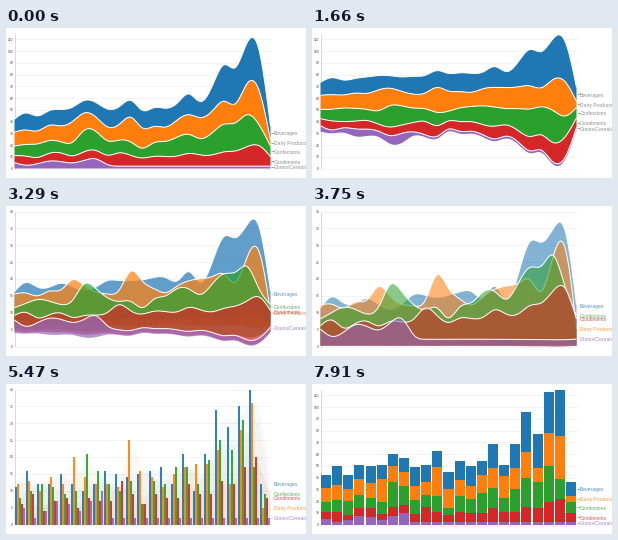
A matplotlib script that plays this animation: 300x150 px, repeating every 7.99 s.

```python
import numpy as np
import matplotlib.pyplot as plt
from matplotlib.animation import FuncAnimation
from matplotlib.collections import PolyCollection
from matplotlib.colors import to_rgb

W, H, DPI = 300, 150, 100
FRAMES, STEP = 170, 47
LEFT, RIGHT, BASE, TOP = 8.5, 264.5, 140.5, 5.5
PX = 72 / DPI

# monthly counts, back layer first
NAMES = ["Beverages", "Dairy Products", "Confections", "Condiments", "Grains/Cereals"]
COLORS = ["#1f77b4", "#ff7f0e", "#2ca02c", "#d62728", "#9467bd"]
DATA = np.array([
    [11, 16, 12, 12, 15, 12, 10, 12, 16, 15, 14, 15, 16, 17, 12, 21, 10, 21, 34, 29, 35, 40, 12],
    [12, 13, 10, 14, 12, 20, 14, 12, 12, 11, 25, 16, 14, 11, 15, 17, 18, 18, 22, 12, 28, 36, 5],
    [8, 10, 12, 11, 9, 10, 21, 16, 12, 10, 13, 6, 13, 12, 17, 17, 12, 19, 25, 22, 31, 17, 9],
    [6, 9, 4, 7, 8, 5, 8, 7, 7, 13, 9, 6, 9, 8, 8, 12, 9, 9, 13, 12, 17, 20, 8],
    [5, 2, 4, 7, 6, 4, 7, 10] + [2] * 15,
], float)
LAYERS, N = DATA.shape
STACK_MAX, GROUP_MAX = 115, 40
GREY = np.array([0.45, 0.45, 0.45])


def ypx(v, top):
    return BASE - np.asarray(v, float) / top * (BASE - TOP)


def ease(t, start, length):
    u = min(max((t - start) / length, 0), 1)
    return 4 * u**3 if u < 0.5 else 1 - 4 * (1 - u)**3


def mix(a, b, e):
    return a + (b - a) * e


def wiggle(rows):
    """Stream baseline that keeps the weighted slope of the layers small."""
    off = np.zeros(N)
    for j in range(1, N):
        d = rows[:, j] - rows[:, j - 1]
        slope = np.cumsum(d) - d / 2
        off[j] = off[j - 1] - (slope * rows[:, j]).sum() / rows[:, j].sum()
    return off - off.min()


def basis(n, sub=8):
    """Weights of a uniform cubic B-spline that meets both end points."""
    idx = np.clip(np.arange(-2, n + 2), 0, n - 1)
    rows = []
    for k in range(len(idx) - 3):
        for u in np.linspace(0, 1, sub, endpoint=False):
            row = np.zeros(n)
            w = ((1 - u)**3, 3 * u**3 - 6 * u**2 + 4,
                 -3 * u**3 + 3 * u**2 + 3 * u + 1, u**3)
            for m in range(4):
                row[idx[k + m]] += w[m] / 6
            rows.append(row)
    rows.append(np.eye(n)[-1])
    return np.array(rows)


upper = np.cumsum(DATA[::-1], axis=0)[::-1]
lower = upper - DATA
offset = wiggle(DATA[::-1])

stack_lo, stack_hi = ypx(lower, STACK_MAX), ypx(upper, STACK_MAX)
stream_lo, stream_hi = ypx(lower + offset, STACK_MAX), ypx(upper + offset, STACK_MAX)
group_lo, group_hi = ypx(DATA * 0, GROUP_MAX), ypx(DATA, GROUP_MAX)

spline = basis(N)
area_x = spline @ np.linspace(LEFT, RIGHT, N)

band = (RIGHT - LEFT) / N
full = band * 0.9
slot = full / LAYERS
band_x = LEFT + band * (np.arange(N) + 0.05)
group_x = band_x + slot * np.arange(LAYERS)[:, None]

fig = plt.figure(figsize=(W / DPI, H / DPI), dpi=DPI, facecolor="white")
ax = fig.add_axes([0, 0, 1, 1])
ax.set_xlim(0, W)
ax.set_ylim(H, 0)
ax.axis("off")


def line(xs, ys, color, width, z):
    return ax.plot(xs, ys, color=color, lw=width * PX, zorder=z,
                   solid_capstyle="butt")[0]


def make_ticks(values):
    out = []
    for v in values:
        grid = line([LEFT, RIGHT], [0, 0], "#eeeeee", 0.7, 0)
        label = ax.text(7.2, 0, str(v), size=3.4 * PX, family="Liberation Sans",
                        ha="right", va="center_baseline", color="#444444", zorder=1)
        out.append((v, grid, label))
    return out


stack_ticks = make_ticks(range(0, 111, 10))
group_ticks = make_ticks(range(0, 41, 5))
line([LEFT, LEFT], [TOP, BASE], "#d0d0d0", 0.8, 1)

areas, edges, bars, labels, leads = [], [], [], [], []
for i, (name, color) in enumerate(zip(NAMES, COLORS)):
    area = PolyCollection([], facecolor=color, edgecolor="none", zorder=2 + i)
    bar = PolyCollection([], facecolor=color, edgecolor="none", zorder=10 + i)
    ax.add_collection(area, autolim=False)
    ax.add_collection(bar, autolim=False)
    areas.append(area)
    bars.append(bar)
    edges.append(line([], [], "white", 1.0, 2.5 + i))
    leads.append(line([RIGHT + 0.5, RIGHT + 3], [0, 0], GREY, 0.6, 20))
    labels.append(ax.text(268, 0, name, size=5 * PX, family="Liberation Sans",
                          va="center", alpha=0.8, zorder=20))


def place_ticks(ticks, axis, alpha):
    for v, grid, label in ticks:
        y = float(mix(ypx(v, STACK_MAX), ypx(v, GROUP_MAX), axis))
        grid.set_ydata([y, y])
        grid.set_alpha(alpha)
        label.set_y(y)
        label.set_alpha(alpha)


def draw(k):
    t = k * STEP
    to_stream = ease(t, 480, 1500)
    to_overlap = ease(t, 2455, 1500)
    to_bars = ease(t, 4390, 1450)
    to_stack = ease(t, 6420, 960)
    to_wide = ease(t, 7380, 550)
    axis = ease(t, 2455, 700) - ease(t, 6400, 600)

    place_ticks(stack_ticks, axis, 1 - axis)
    place_ticks(group_ticks, axis, axis)

    lo = mix(mix(stack_lo, stream_lo, to_stream), group_lo, to_overlap)
    hi = mix(mix(stack_hi, stream_hi, to_stream), group_hi, to_overlap)
    fill = mix(1, 0.55, to_overlap) * (1 - to_bars)

    bar_lo = mix(group_lo, stack_lo, to_stack)
    bar_hi = mix(group_hi, stack_hi, to_stack)
    bar_w = mix(slot, full, to_wide)
    bar_x = mix(group_x, band_x, to_wide)

    for i in range(LAYERS):
        y0, y1 = spline @ lo[i], spline @ hi[i]
        areas[i].set_verts([np.column_stack([np.r_[area_x, area_x[::-1]],
                                             np.r_[y1, y0[::-1]]])])
        areas[i].set_alpha(fill)
        edges[i].set_data(area_x, y1)
        edges[i].set_alpha(1 - to_bars)

        x0 = bar_x[i]
        xs = np.stack([x0, x0 + bar_w, x0 + bar_w, x0], axis=1)
        ys = np.stack([bar_hi[i], bar_hi[i], bar_lo[i], bar_lo[i]], axis=1)
        bars[i].set_verts(np.stack([xs, ys], axis=2))
        bars[i].set_alpha(to_bars)
        bars[i].set_visible(to_bars > 0)

        mid = (stack_lo[i, -1] + stack_hi[i, -1]) / 2
        flow = (stream_lo[i, -1] + stream_hi[i, -1]) / 2
        y = mix(mix(mid, flow, to_stream), group_hi[i, -1], to_overlap)
        y = mix(y, mid, to_stack)
        color = mix(GREY, np.array(to_rgb(COLORS[i])), to_overlap)
        labels[i].set_y(y + 0.6)
        labels[i].set_color(color)
        leads[i].set_ydata([y, y])
        leads[i].set_color(color)
        leads[i].set_alpha(1 - to_overlap + to_stack)
    return []


anim = FuncAnimation(fig, draw, frames=FRAMES, interval=STEP, repeat=True,
                     repeat_delay=0, blit=False)
plt.show()
```
